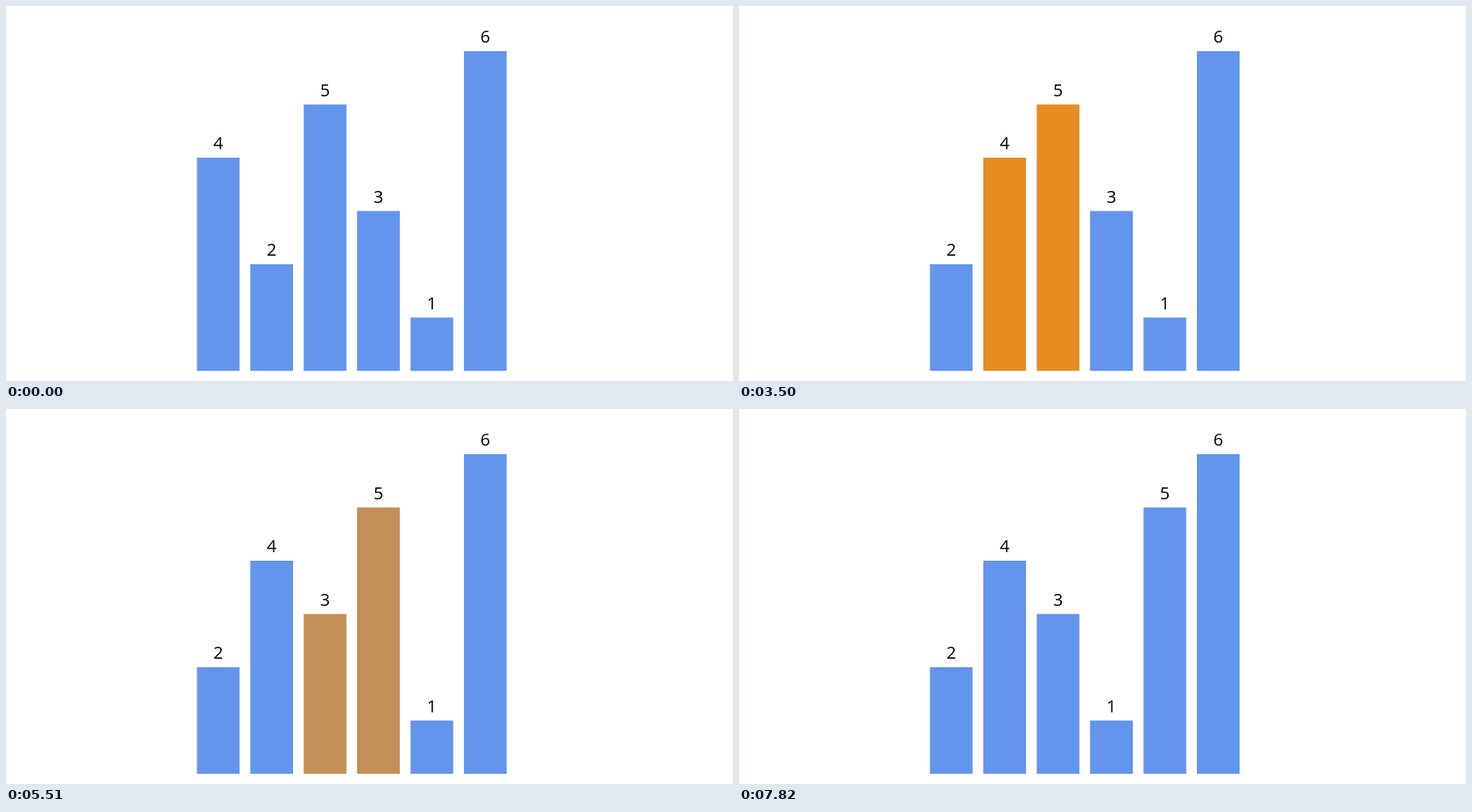
Recreate the animation shown at these times as an HTML page with a canvas. Size 851 by 440 pixels, loop 8 s.

```html
<!DOCTYPE html>
<html lang="en">
<head>
<meta charset="utf-8">
<title>Bubble sort</title>
<style>
  html, body { margin: 0; overflow: hidden; background: #fff; }
  canvas { display: block; }
</style>
</head>
<body>
<canvas width="851" height="440"></canvas>
<script>
const ctx = document.querySelector('canvas').getContext('2d');
const LOOP = 8000, FADE = 510;
const UNIT = 62.5, LEFT = 223.5, WIDTH = 50, FLOOR = 428;
const BLUE = [100, 149, 237], ORANGE = [255, 140, 0];
const VALUES = [4, 2, 5, 3, 1, 6];

// Each comparison: left slot, highlight start, swap start (if any), fade-out start
const STEPS = [
  { slot: 0, up: 325, swap: 855, down: 1400 },
  { slot: 1, up: 2274, down: 3330 },
  { slot: 2, up: 4260, swap: 4765, down: 5280 },
  { slot: 3, up: 6245, swap: 6738, down: 7245 },
];

const progress = (t, start, end) => Math.min(1, Math.max(0, (t - start) / (end - start)));
const inOut = easeIn => p => p < .5 ? easeIn(2 * p) / 2 : 1 - easeIn(2 - 2 * p) / 2;
const cubic = inOut(w => w ** 3);
const back = inOut(w => w * w * (2.70158 * w - 1.70158));
const mix = k => `rgb(${BLUE.map((c, i) => Math.round(c + (ORANGE[i] - c) * k))})`;

function layout(t) {
  let bars = VALUES.map((value, x) => ({ value, x, glow: 0 }));
  for (const { slot, up, swap, down } of STEPS) {
    if (t < up) break;
    const a = bars[slot], b = bars[slot + 1];
    a.glow = b.glow = cubic(progress(t, up, up + FADE)) - cubic(progress(t, down, down + FADE));
    if (swap) {
      const shift = back(progress(t, swap, down));
      a.x = slot + shift;
      b.x = slot + 1 - shift;
      bars[slot] = b;
      bars[slot + 1] = a;
    }
  }
  return bars;
}

function draw(now) {
  const bars = layout(now % LOOP);
  ctx.fillStyle = '#fff';
  ctx.fillRect(0, 0, 851, 440);
  for (const { value, x, glow } of bars) {
    ctx.fillStyle = mix(glow);
    ctx.fillRect(LEFT + x * UNIT, FLOOR - value * UNIT, WIDTH, value * UNIT);
  }
  ctx.fillStyle = '#000';
  ctx.font = '20px "Open Sans", "Noto Sans", sans-serif';
  ctx.textAlign = 'center';
  for (const { value, x } of bars)
    ctx.fillText(value, LEFT + x * UNIT + WIDTH / 2, FLOOR - value * UNIT - 10);
  requestAnimationFrame(draw);
}
requestAnimationFrame(draw);
</script>
</body>
</html>
```
